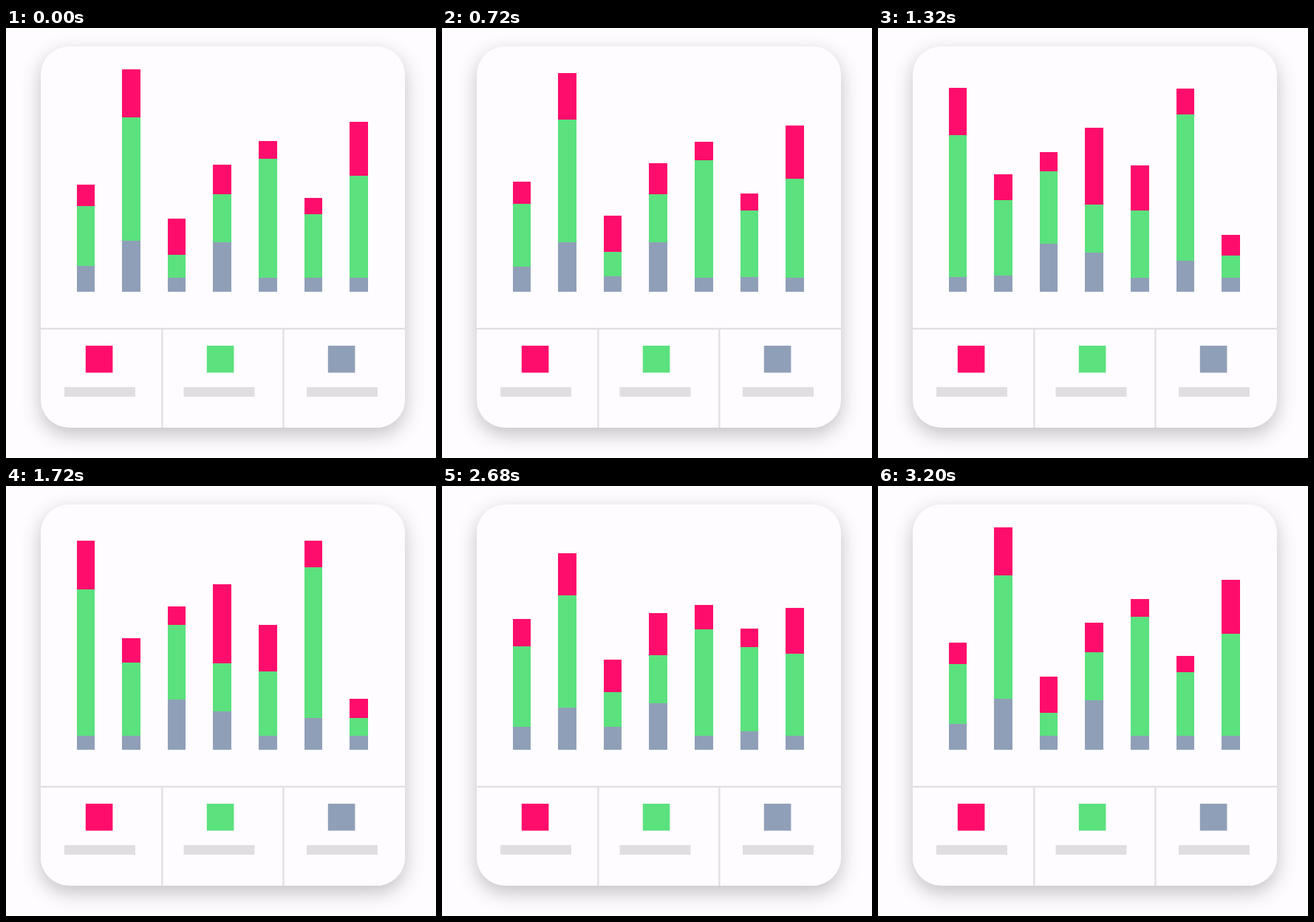
Animation, 582 px wide and 582 px high, one loop 3240 ms. Source, as an HTML page:

```html
<!DOCTYPE html>
<html lang="en">
<head>
<meta charset="utf-8">
<title>Stacked bars</title>
<style>
  html, body { margin: 0; width: 100%; height: 100%; overflow: hidden; background: #fefcfe; }
  svg { position: absolute; left: 0; top: 0; }
  .card {
    position: absolute; left: 47px; top: 25px; width: 493px; height: 516px;
    border-radius: 38px; background: #fefcfe;
    box-shadow: 0 9px 26px rgba(60, 55, 65, .3);
  }
</style>
</head>
<body>
<div class="card"></div>
<svg id="chart" width="582" height="582" viewBox="0 0 582 582"></svg>
<script>
const LOOP = 3240, STEP = 40;
const COLORS = ['#ff0d6c', '#5be17e', '#8f9fb7'];
const LINE = '#e1dfe2', LABEL = '#e0dee1';
const BASE = 357, BAR = 24.5, FIRST = 95.8, PITCH = 61.55, CELL = 164;
const MOVE = 963, RISE = 536, RETURN = 2042;
const LOW = 19.5; // resting height of the slate part

// Heights of pink, green and slate at rest and at the far pose
const data = [
  { from: [28.6, 81, 35], to: [66, 197.5] },
  { from: [64.5, 167.5, 69], to: [33.5, 98.5] },
  { from: [49.5, 30.5], to: [25, 101, 68] },
  { from: [40.5, 65, 67], to: [107.5, 65, 52] },
  { from: [23.5, 161], to: [63, 86.5] },
  { from: [22.5, 85.5], to: [35.5, 204, 43.5] },
  { from: [73.5, 137.5], to: [25.5, 24] }
];

const chart = document.getElementById('chart');

function rect(x, y, width, height, fill) {
  const el = document.createElementNS('http://www.w3.org/2000/svg', 'rect');
  const attrs = { x, y, width, height, fill };
  for (const key in attrs) el.setAttribute(key, attrs[key]);
  return chart.appendChild(el);
}

rect(47, 405.8, 493, 2.4, LINE);
COLORS.forEach((fill, i) => {
  if (i) rect(46.2 + i * CELL, 407, 2.4, 134, LINE);
  rect(107.8 + i * CELL, 430, 36.6, 36.5, fill);
});
[79, 240.5, 407].forEach(x => rect(x, 486, 96, 13, LABEL));

const bars = data.map(({ from, to }, i) => COLORS.map((fill, k) => {
  const el = rect(FIRST + i * PITCH, 0, BAR, 0, fill);
  el.setAttribute('shape-rendering', 'crispEdges');
  return { el, from: from[k] ?? LOW, to: to[k] ?? LOW };
}));

// One axis of a cubic bezier from 0 to 1 with handles a and b
function bezier(s, a, b) {
  const r = 1 - s;
  return 3 * r * r * s * a + 3 * r * s * s * b + s ** 3;
}

function ease(x) {
  let lo = 0, hi = 1;
  for (let n = 0; n < 30; n++) {
    const mid = (lo + hi) / 2;
    if (bezier(mid, .677, .459) < x) lo = mid;
    else hi = mid;
  }
  return bezier(hi, 0, 1);
}

function draw(time) {
  const t = Math.floor((time % LOOP) / STEP) * STEP;
  const p = ease((t - RISE) / MOVE) - ease((t - RETURN) / MOVE);
  for (const parts of bars) {
    let y = BASE;
    for (const { el, from, to } of [...parts].reverse()) {
      const height = from + (to - from) * p;
      y -= height;
      el.setAttribute('y', y);
      el.setAttribute('height', height);
    }
  }
}

const start = performance.now();
function tick() {
  draw(performance.now() - start);
  requestAnimationFrame(tick);
}
draw(0);
requestAnimationFrame(tick);
</script>
</body>
</html>
```
